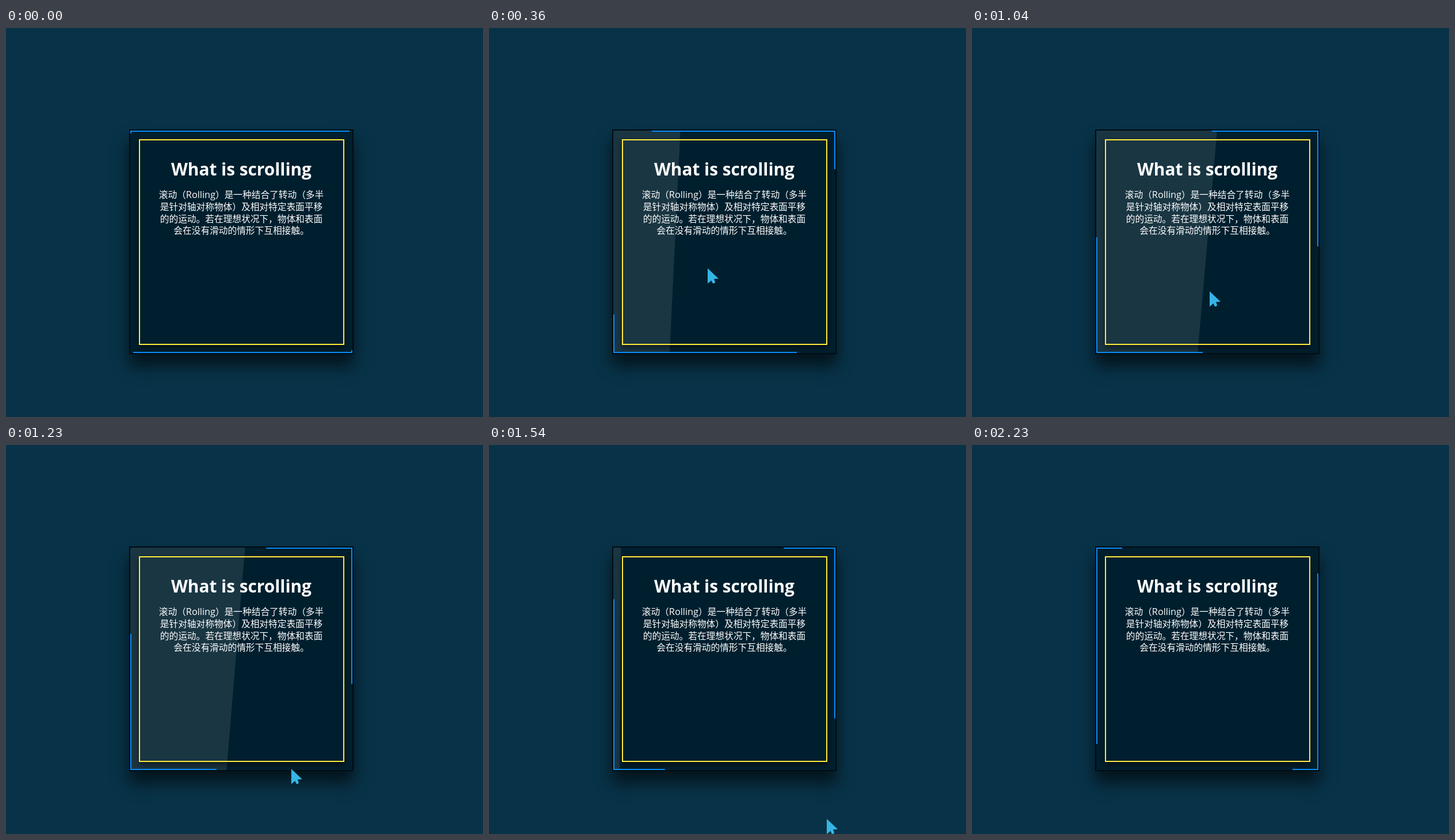
An HTML page for the animation above (2290 ms loop, 829 px wide and 675 px high).

```html
<!DOCTYPE html>
<html lang="zh-CN">
<head>
<meta charset="utf-8">
<title>What is scrolling</title>
<style>
  html, body { margin: 0; width: 100%; height: 100%; overflow: hidden; background: #083247; }
  body { position: relative; }
  svg { position: absolute; left: 0; top: 0; display: block; }
  .card {
    position: absolute; left: 214px; top: 176px; width: 386px; height: 386px;
    border: 2px solid #000c13; background: #001f2e;
    box-shadow: 0 20px 25px rgba(0, 0, 0, .6);
  }
  .inside { position: absolute; inset: 0; overflow: hidden; }
  .content {
    position: absolute; inset: 15px 14px 14px 15px; border: 2px solid #ffeb3b;
    box-shadow: 0 5px 10px rgba(9, 0, 0, .5);
  }
  text { fill: #fff; text-anchor: middle; }
  .title { font: 700 29.8px "Open Sans", "Noto Sans", sans-serif; }
  .body { font: 500 15.7px "Noto Sans CJK SC", "Noto Sans CJK", sans-serif; }
  .latin { font: 500 16.3px "Open Sans", "Noto Sans", sans-serif; }
</style>
</head>
<body>
<div class="card">
  <div class="inside">
    <svg width="386" height="386"><path id="shine" fill="#fff" fill-opacity=".1"/></svg>
    <div class="content"></div>
  </div>
</div>
<svg width="829" height="675" viewBox="0 0 829 675">
  <text class="title" x="409" y="255.5">What is scrolling</text>
  <g class="body">
    <text x="409" y="295.3">滚动（<tspan class="latin">Rolling</tspan>）是一种结合了转动（多半</text>
    <text x="409" y="316">是针对轴对称物体）及相对特定表面平移</text>
    <text x="409" y="336.6">的的运动。若在理想状况下，物体和表面</text>
    <text x="409" y="357.2">会在没有滑动的情形下互相接触。</text>
  </g>
  <g id="edges" fill="#0a8cf8"></g>
  <path id="cursor" fill="#35b4e5" d="M0 0V26.5L6.5 21L8.5 25.5Q10.5 27 12.5 25.2L13 23.5L11 18.5L19 18Z"/>
</svg>
<script>
const LOOP = 2290, SIZE = 386, LEFT = 216, TOP = 178, LAST_STEP = 36;
const HOVER_IN = 200, HOVER_OUT = 1199, HOVER_TIME = 500;

// Knots: [step, value...]
const runnerTrack = [[0, -5], [6, 67], [10, 115], [17, 201], [22, 260], [30, 357], [36, 431]];
const cursorTrack = [[0, 860, 760], [1, 790, 715], [2, 711, 657], [3, 580, 562], [6, 380, 417],
  [10, 379, 417], [17, 413, 457], [22, 551, 632], [27, 611, 660], [28, 652, 669],
  [29, 690, 690], [36, 860, 760]];

const $ = id => document.getElementById(id);
const clamp = (v, lo, hi) => Math.min(hi, Math.max(lo, v));

function sample(track, step, column = 1) {
  const next = track.findIndex(knot => knot[0] > step);
  const i = next < 0 ? track.length - 1 : next;
  const a = track[i - 1], b = track[i];
  return a[column] + (b[column] - a[column]) * (step - a[0]) / (b[0] - a[0]);
}

// The CSS "ease" curve
function ease(x) {
  if (x <= 0 || x >= 1) return clamp(x, 0, 1);
  const bezier = (s, p, q) => 3 * s * (1 - s) ** 2 * p + 3 * s * s * (1 - s) * q + s ** 3;
  let lo = 0, hi = 1;
  for (let i = 0; i < 24; i++) {
    const mid = (lo + hi) / 2;
    if (bezier(mid, .25, .25) < x) lo = mid; else hi = mid;
  }
  return bezier(lo, .1, 1);
}

// Top, right, bottom and left edges share one bar, turned about the card's centre
const bars = [0, 90, 180, 270].map(angle => {
  const group = document.createElementNS("http://www.w3.org/2000/svg", "g");
  group.setAttribute("transform",
    `translate(${LEFT} ${TOP}) rotate(${angle} ${SIZE / 2} ${SIZE / 2})`);
  const bar = document.createElementNS("http://www.w3.org/2000/svg", "rect");
  bar.setAttribute("height", 2);
  group.append(bar);
  $("edges").append(group);
  return bar;
});

function drawBars(offset) {
  bars.forEach((bar, i) => {
    const phase = offset + SIZE * (1 + i % 2);
    const shift = phase % (2 * SIZE) - SIZE;
    bar.setAttribute("x", Math.max(0, shift));
    bar.setAttribute("width", SIZE - Math.abs(shift));
  });
}

function drawShine(time) {
  const amount = ease((time - HOVER_IN) / HOVER_TIME) - ease((time - HOVER_OUT) / HOVER_TIME);
  const middle = SIZE / 2 * amount;
  const lean = SIZE / 2 * Math.tan(amount * 5 * Math.PI / 180);
  $("shine").setAttribute("d", `M0 0H${middle + lean}L${middle - lean} ${SIZE}H0Z`);
}

function draw(time) {
  // The picture advances in nine steps per 560 ms
  const step = clamp(Math.floor((time - 50) * 9 / 560 + 1.13), 0, LAST_STEP);
  drawBars(sample(runnerTrack, step));
  drawShine(50 + (step - 1) * 560 / 9);
  $("cursor").setAttribute("transform",
    `translate(${sample(cursorTrack, step, 1)} ${sample(cursorTrack, step, 2)})`);
}

const start = performance.now();
function tick() {
  draw((performance.now() - start) % LOOP);
  requestAnimationFrame(tick);
}
tick();
</script>
</body>
</html>
```
